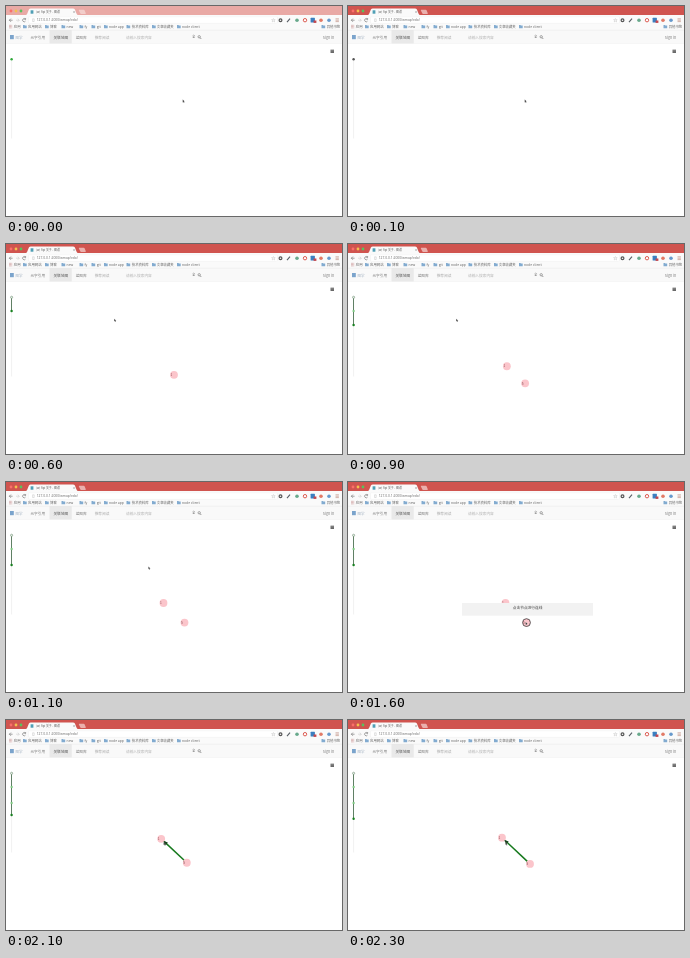
Write an HTML page that moves like this. It is 336 px wide and 210 px high and loops after 2400 ms.

```html
<!DOCTYPE html>
<html lang="zh">
<head>
<meta charset="utf-8">
<title>Graph editor</title>
<style>
html, body { margin: 0; width: 100%; height: 100%; overflow: hidden; background: #fff; }
svg { display: block; width: 100vw; height: 100vh; animation: play 2.4s step-end infinite; }
text { font: 3.7px "Noto Sans CJK SC", "Noto Sans CJK", "Noto Sans", sans-serif; fill: #808080; }
.url { font: 3.3px "Open Sans", "Noto Sans", sans-serif; fill: #666; }
.marks text { font-size: 3.4px; fill: #666; }
.mid { text-anchor: middle; }
.bar { fill: var(--bar); }
.plus { fill: var(--plus); }

/* --k: spread of the nodes, --p: timeline end, --x/--y: pointer */
.link { opacity: var(--link); }
.link path { transform: scale(var(--k)); vector-effect: non-scaling-stroke; }
.a { opacity: var(--a); transform: translate(calc(var(--k) * -10.5px), calc(var(--k) * -9.8px)); }
.b { opacity: var(--b); transform: translate(calc(var(--k) * 10.5px), calc(var(--k) * 9.8px)); }
.ring { stroke-opacity: var(--ring); }
.tip { opacity: var(--tip); }
.done { transform: scaleY(calc(var(--p) - 53)); }
.start { opacity: var(--a); }
.head { fill: var(--head); transform: translateY(calc(var(--p) * 1px)); }
.m1 { opacity: var(--m1); }
.m2 { opacity: var(--m2); }
.pointer { transform: translate(calc(var(--x) * 1px), calc(var(--y) * 1px)) scale(.8); }

@keyframes play {
  0%     { --bar: #e9a9a5; --plus: #f2cdca; --x: 176.7; --y: 93.6; --p: 53.3; --head: #2fa83a;
           --k: 0; --a: 0; --b: 0; --m1: 0; --m2: 0; --link: 0; --ring: 0; --tip: 0; }
  4.16%  { --bar: #d0544f; --plus: #eab0ad; --x: 176.7; --y: 93.6; --head: #555; }
  8.33%  { --x: 128; --y: 80; }
  12.5%  { --x: 108.2; --y: 74.8; }
  20.83% { --p: 61; --head: #17801f; --a: 1; --k: 0; }
  25%    { --p: 67; }
  29.16% { --p: 69; --m1: 1; --b: 1; --k: .3; }
  33.33% { --p: 76; --k: .6; }
  37.5%  { --p: 81; --k: .87; }
  41.66% { --p: 83; --k: 1; --x: 108.2; --y: 74.8; }
  45.83% { --x: 142.4; --y: 84.5; }
  50%    { --x: 166; --y: 116; }
  54.16% { --x: 178; --y: 143; --ring: 0; }
  58.33% { --x: 177.6; --y: 140; --ring: 1; }
  66.66% { --x: 177.6; --y: 140; --tip: 1; }
  70.83% { --x: 176; --y: 138.5; }
  75%    { --x: 165; --y: 129; --tip: 0; }
  79.16% { --x: 157.6; --y: 122.2; --p: 83; --k: 1; --m2: 0; --link: 0; --ring: 1; }
  83.33% { --p: 88; --k: 1.08; --m2: 1; --link: 1; --ring: 0; }
  87.5%  { --p: 95; --k: 1.22; }
  91.66% { --p: 98; --k: 1.3; }
  95.83%, 100% { --bar: #d0544f; --plus: #eab0ad; --x: 157.6; --y: 122.2; --p: 98.7; --head: #17801f;
           --k: 1.335; --a: 1; --b: 1; --m1: 1; --m2: 1; --link: 1; --ring: 0; --tip: 0; }
}
</style>
</head>
<body>
<svg viewBox="0 0 336 210" preserveAspectRatio="none">
  <defs>
    <path id="folder" d="M0 0h1.4l.5.5h1.8v2.8h-3.7z" fill="#82abd0"/>
  </defs>
  <rect width="336" height="210" fill="#fff"/>

  <!-- title bar -->
  <rect class="bar" width="336" height="9"/>
  <circle cx="5" cy="5" r="1.4" fill="#fb6f6a"/>
  <circle cx="10" cy="5" r="1.4" fill="#f3c04e"/>
  <circle cx="15" cy="5" r="1.4" fill="#58c25c"/>
  <path d="M19 9.1c1.5 0 1.7-.5 2.3-1.7l1.6-3.8q.6-1.2 2-1.2h42q1.4 0 2 1.2l1.6 3.8c.6 1.2.8 1.7 2.3 1.7z" fill="#fafafa"/>
  <rect x="24.6" y="4.3" width="2.8" height="3.4" fill="#4f9fb5"/>
  <text x="30" y="7.2" style="font-size:2.9px;fill:#555">[w] Api 关于 - 图谱</text>
  <path d="M67.3 5.2l1.6 1.6m0-1.6l-1.6 1.6" stroke="#777" stroke-width=".45"/>
  <path class="plus" d="M73.3 3.8h4.4q.7 0 1 .7l1.1 2.8q.2.8-.6.8h-4q-.8 0-1-.8l-1.3-2.7q-.3-.8.4-.8z"/>

  <!-- toolbar -->
  <rect y="9" width="336" height="15.2" fill="#fafafa"/>
  <rect x="22.5" y="10.8" width="249" height="6.6" rx="1" fill="#fff" stroke="#e6e6e6" stroke-width=".3"/>
  <g fill="none" stroke="#666" stroke-width=".6">
    <path d="M6.6 14.2H3.4m1.5-1.6l-1.6 1.6 1.6 1.6"/>
    <path d="M10 14.2h3.2m-1.5-1.6l1.6 1.6-1.6 1.6" stroke="#ccc"/>
    <path d="M19.4 13.1a1.6 1.6 0 1 0 .1 2m.1-3v1.3h-1.3"/>
  </g>
  <path d="M26.6 12.8h1.6v2.7h-1.6z" fill="none" stroke="#aaa" stroke-width=".35"/>
  <text class="url" x="30.7" y="15.4">127.0.0.1:2000/wmap/edo/</text>
  <path d="M267.4 12.5l.5 1.2h1.3l-1 .9.4 1.3-1.2-.7-1.2.7.4-1.3-1-.9h1.3z" fill="none" stroke="#aaa" stroke-width=".35"/>
  <circle cx="274.5" cy="14.2" r="1.4" fill="none" stroke="#555" stroke-width="1.2"/>
  <path d="M281 16.1l3-3.5" stroke="#555b62" stroke-width="1.1"/>
  <circle cx="291" cy="14.2" r="1.8" fill="#68a98c"/>
  <circle cx="299" cy="14.2" r="1.7" fill="#fff" stroke="#dc5a50" stroke-width="1"/>
  <rect x="304.6" y="11.8" width="4.3" height="4.6" rx=".5" fill="#3b7fc0"/>
  <rect x="307.6" y="14.5" width="2.8" height="2.4" fill="#c5474e"/>
  <circle cx="315" cy="14.2" r="1.8" fill="#e27a66"/>
  <circle cx="323" cy="14.2" r="1.8" fill="#6699cc"/>
  <path d="M329.5 12.8h3.4m-3.4 1.4h3.4m-3.4 1.4h3.4" stroke="#b98474" stroke-width=".6"/>

  <!-- bookmarks -->
  <g class="marks">
    <path d="M3 19.3h3.2M3 20.6h3.2M3 21.9h3.2" stroke="#c99" stroke-width=".8" stroke-dasharray=".8 .4"/>
    <text x="7.8" y="22">应用</text>
    <use href="#folder" x="17" y="18.9"/><text x="22" y="22">应用网站</text>
    <use href="#folder" x="39" y="18.9"/><text x="44" y="22">博客</text>
    <use href="#folder" x="55.5" y="18.9"/><text x="60.6" y="22">new</text>
    <use href="#folder" x="73.5" y="18.9"/><text x="78.5" y="22">fy</text>
    <use href="#folder" x="85.5" y="18.9"/><text x="90.7" y="22">git</text>
    <use href="#folder" x="98" y="18.9"/><text x="103" y="22">node app</text>
    <use href="#folder" x="120.5" y="18.9"/><text x="125.8" y="22">技术资料库</text>
    <use href="#folder" x="146" y="18.9"/><text x="150.8" y="22">文章收藏夹</text>
    <use href="#folder" x="171" y="18.9"/><text x="176" y="22">node client</text>
    <use href="#folder" x="315.5" y="18.9"/><text x="320.7" y="22">其他书签</text>
  </g>

  <!-- navigation -->
  <rect y="24.2" width="336" height="13.3" fill="#f9f9f9"/>
  <rect x="43.5" y="24.2" width="22.2" height="13.3" fill="#e9e9e9"/>
  <path d="M0 24.2h336" stroke="#dcdcdc" stroke-width=".4"/>
  <path d="M0 37.6h336" stroke="#ebebeb" stroke-width=".4"/>
  <rect x="4" y="29" width="3.8" height="4.2" fill="#7ba4cc"/>
  <text x="9.4" y="32.6" style="font-size:3.5px;fill:#a3b2c2">图学</text>
  <text class="mid" x="31.8" y="32.6">元字引用</text>
  <text class="mid" x="54.8" y="32.6" style="fill:#555">关联地图</text>
  <text class="mid" x="75.2" y="32.6">蓝图库</text>
  <text class="mid" x="96" y="32.6" style="fill:#aaa">推荐阅读</text>
  <text x="120" y="32.6" style="fill:#b4b4b4">请输入搜索内容</text>
  <text x="186.3" y="32.4" style="font-size:3px;fill:#555">全</text>
  <circle cx="193.2" cy="30.8" r="1.2" fill="none" stroke="#555" stroke-width=".5"/>
  <path d="M194 31.6l1.3 1.4" stroke="#555" stroke-width=".6"/>
  <text x="316.7" y="32.6">Sign in</text>
  <path d="M324.5 44.2h3.5m-3.5 1.1h3.5m-3.5 1.1h3.5" stroke="#444" stroke-width=".9"/>

  <!-- timeline -->
  <path d="M5.6 53v79.5" stroke="#e6e6e6" stroke-width=".6"/>
  <g transform="translate(5.6 53)"><rect class="done" x="-.4" width=".8" height="1" fill="#3b6342"/></g>
  <circle class="start" cx="5.6" cy="53.3" r="1.1" fill="#e4f4e5" stroke="#607d64" stroke-width=".5"/>
  <g fill="#8fdc90" stroke="#55a85b" stroke-width=".3">
    <circle class="m1" cx="5.6" cy="67" r="1"/>
    <circle class="m2" cx="5.6" cy="83" r="1"/>
  </g>
  <circle class="head" cx="5.6" r="1.2"/>

  <!-- graph -->
  <g transform="translate(168 130.8)">
    <g class="link"><path d="M-8.2-7.7L10.5 9.8" stroke="#16791d" stroke-width="1.5"/></g>
    <g class="a">
      <circle r="3.9" fill="#fbc5cb"/>
      <text class="mid" x="-2.6" y="1.1" style="font-size:3.2px;fill:#8a4a50">1</text>
      <path class="link" d="M2.4 2.2l4.3 1.5-2.7 2.9z" fill="#173d1b"/>
    </g>
    <g class="b">
      <circle class="ring" r="3.9" fill="#fbc5cb" stroke="#222" stroke-width=".7"/>
      <text class="mid" x="-2.6" y="1.3" style="font-size:3.2px;fill:#743a40">5</text>
    </g>
  </g>

  <g class="tip">
    <rect x="114" y="121" width="131" height="12.7" fill="#f2f2f2"/>
    <text class="mid" x="179.6" y="126.8" style="fill:#444">点击节点进行连线</text>
  </g>

  <path class="pointer" d="M0 0v3.5l.8-.7.6 1.3.7-.3-.6-1.3h1.1z" fill="#222" stroke="#fff" stroke-width=".25"/>
</svg>
</body>
</html>
```
